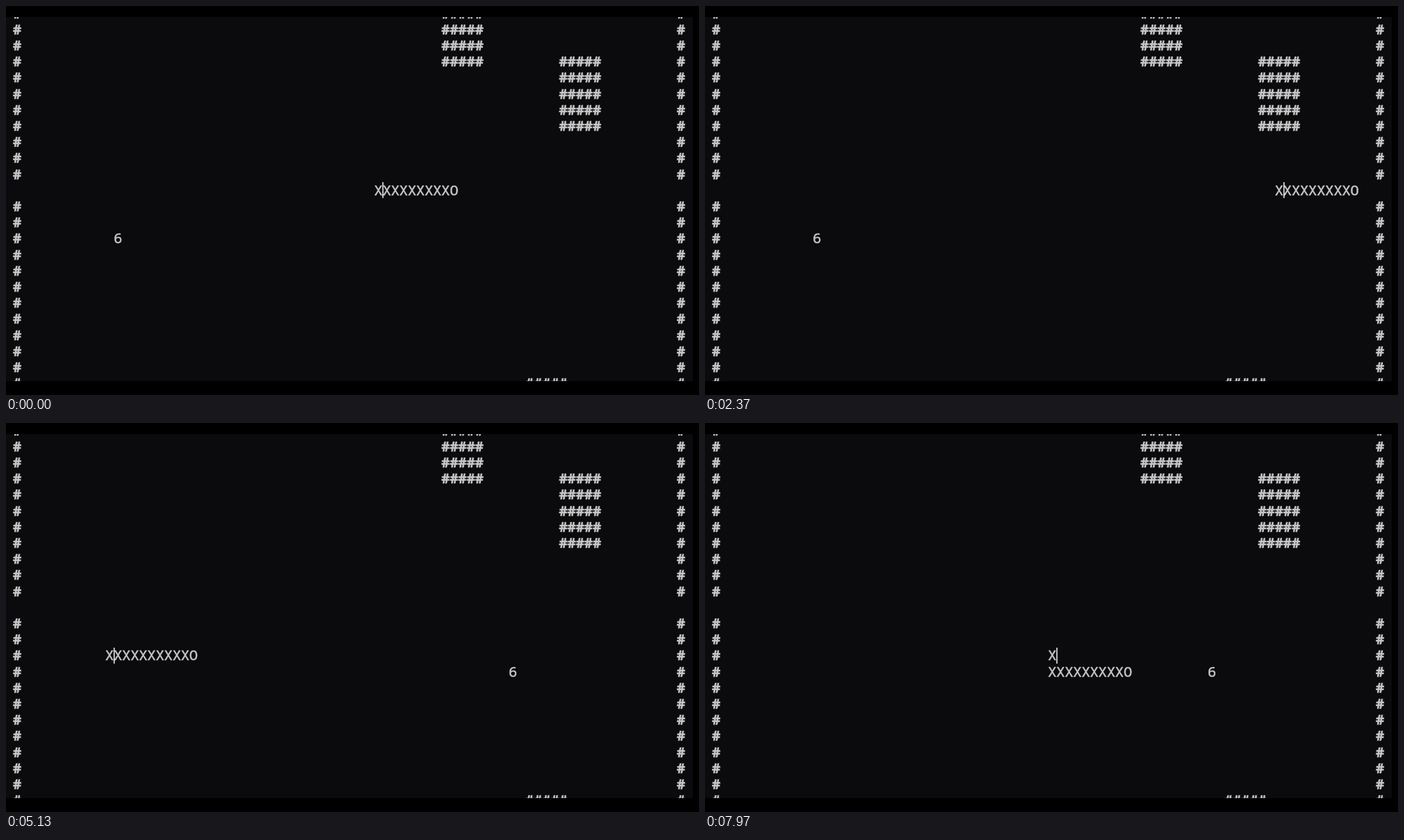
These frames come from a looping animation (998 px wide and 561 px high, 8000 ms). An HTML page with a canvas:

```html
<!DOCTYPE html>
<html lang="en">
<head>
<meta charset="utf-8">
<title>Console snake</title>
<style>
  html, body { margin: 0; width: 100%; height: 100%; overflow: hidden; background: #000; }
  canvas { display: block; }
</style>
</head>
<body>
<canvas id="stage" width="998" height="561"></canvas>
<script>
const ctx = document.getElementById('stage').getContext('2d');
const LOOP = 8000;
const CELL_W = 12.1, CELL_H = 23.2;
const LEFT = 10, FIRST_BASELINE = 40.7;
const LAST_COL = 79, GAP_ROW = 10;
const EAT_STEP = 43;
const FONT = '20.2px "Noto Sans Mono", monospace';
const INK = '#c8c8c8';

// The game ticks a little faster once the snake has eaten.
function stepAt(t) {
  return t < 4362 ? Math.floor((t + 30) / 100) : 44 + Math.floor((t - 4362) / 95.9);
}

// Cell [column, row] that the head enters at a given step.
function pathCell(step) {
  if (step <= 33) return [(52 + step) % (LAST_COL + 1), GAP_ROW];
  if (step <= 36) return [5, step - 23];
  if (step <= 71) return [step - 31, 13];
  return [step - 32, 14];
}

function put(char, col, row) {
  const x = LEFT + (col + 0.5) * CELL_W;
  const y = FIRST_BASELINE + row * CELL_H;
  ctx.fillText(char, x, y);
  ctx.strokeText(char, x, y);
}

function drawBlock(col, firstRow, lastRow) {
  for (let row = firstRow; row <= lastRow; row++)
    for (let i = 0; i < 5; i++) put('#', col + i, row);
}

function drawField() {
  for (let row = -1; row <= 22; row++) {
    if (row === GAP_ROW) continue;
    put('#', 0, row);
    put('#', LAST_COL, row);
  }
  drawBlock(51, -1, 2);
  drawBlock(65, 2, 6);
  drawBlock(61, 22, 22);
}

function drawSnake(step) {
  const tail = step - (step < EAT_STEP ? 9 : 10);
  for (let i = tail; i < step; i++) put('X', ...pathCell(i));
  put('O', ...pathCell(step));

  const [col, row] = pathCell(tail);
  ctx.fillStyle = '#f2f2f2';
  ctx.fillRect(Math.round(LEFT + (col + 1) * CELL_W), Math.round(22 + row * CELL_H), 1.5, 23);
}

function draw(t) {
  const step = stepAt(t);
  ctx.fillStyle = '#000';
  ctx.fillRect(0, 0, 998, 561);
  ctx.save();
  ctx.beginPath();
  ctx.rect(0, 16, 989, 525);
  ctx.clip();
  ctx.fillStyle = '#0b0b0d';
  ctx.fillRect(0, 16, 989, 525);

  ctx.textAlign = 'center';
  ctx.fillStyle = ctx.strokeStyle = INK;
  ctx.lineJoin = 'round';
  ctx.lineWidth = 0.5;
  ctx.font = 'bold ' + FONT;
  drawField();
  ctx.font = FONT;
  if (step < EAT_STEP) put('6', 12, 13);
  else if (step > EAT_STEP) put('6', 59, 14);
  drawSnake(step);
  ctx.restore();
}

const start = performance.now();
function tick() {
  draw((performance.now() - start) % LOOP);
  requestAnimationFrame(tick);
}
tick();
</script>
</body>
</html>
```
